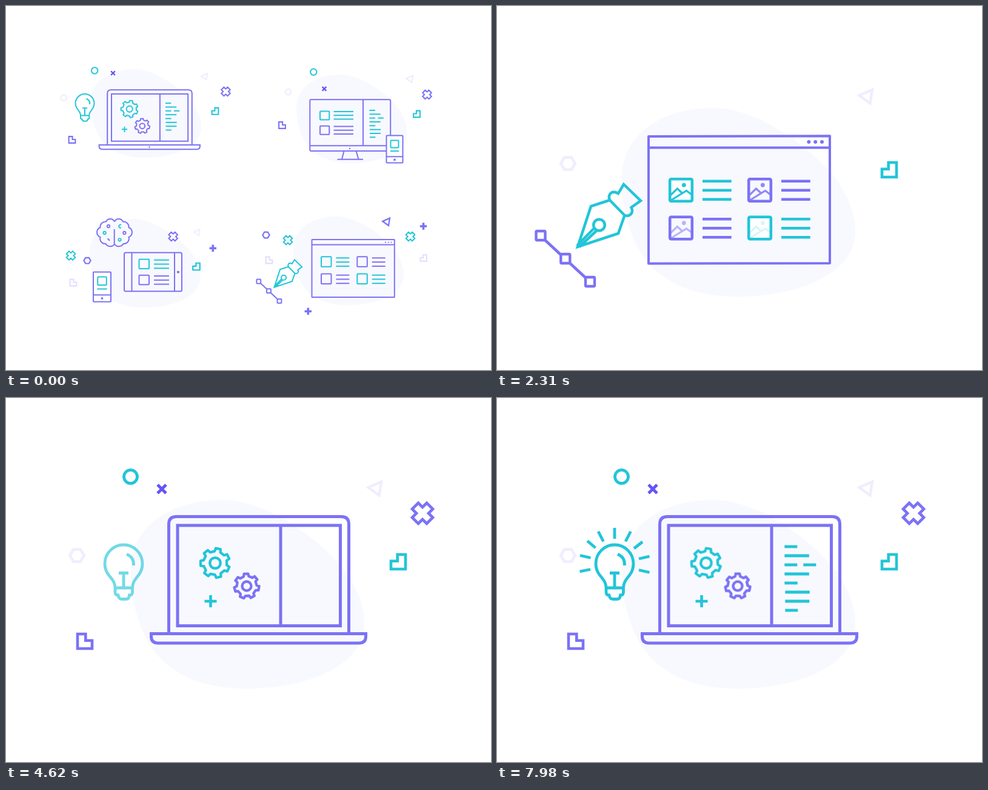
An HTML page for the animation above (8 s loop, 800 px wide and 600 px high).

```html
<!DOCTYPE html>
<html lang="en">
<head>
<meta charset="utf-8">
<title>Workflow illustrations</title>
<style>
  html, body { margin: 0; width: 100%; height: 100%; overflow: hidden; background: #fff; }
  svg { display: block; width: 100%; height: 100%; fill: none; }
</style>
</head>
<body>
<svg id="stage" viewBox="0 0 800 600"></svg>
<script>
const LOOP = 8000;
const P = '#7c72f5', T = '#22c5d8', D = '#6455f6', F = '#f0edfe', G = '#e3ddfd';

// ---- drawing helpers ----
const path = (d, c, w, extra = '') => `<path d="${d}" stroke="${c}" stroke-width="${w}" ${extra}/>`;
const line = (x1, y1, x2, y2, c, w = 2) => path(`M${x1} ${y1}L${x2} ${y2}`, c, w);
const rect = (x, y, w, h, c, s = 2, r = 1, fill = 'none') =>
  `<rect x="${x}" y="${y}" width="${w}" height="${h}" rx="${r}" fill="${fill}" stroke="${c}" stroke-width="${s}"/>`;
const ring = (x, y, r, c, w) => `<circle cx="${x}" cy="${y}" r="${r}" stroke="${c}" stroke-width="${w}"/>`;
const dot = (x, y, r, c) => `<circle cx="${x}" cy="${y}" r="${r}" fill="${c}"/>`;
const group = (id, body) => `<g id="${id}">${body}</g>`;
const place = (x, y, k, body, ky = k) => `<g transform="translate(${x} ${y}) scale(${k} ${ky})">${body}</g>`;
const rows = (x1, x2, y, step, c, w = 2) =>
  [0, 1, 2].map(i => line(x1, y + i * step, x2, y + i * step, c, w)).join('');

// ---- small ornaments, centred on x, y ----
const cross = (x, y, c, k = 1) => place(x, y, k, path(
  'M-7-17L0-10 7-17 17-7 10 0 17 7 7 17 0 10-7 17-17 7-10 0-17-7Z', c, 4.6));
const corner = (x, y, c, k = 1, flip = 1) => place(x, y, k * flip, path(
  'M-12-12H1.3V-1.2H12V12H-12Z', c, 4.6), k);
const wedge = (x, y, c, k = 1) => place(x, y, k, path('M-10.5-2L11-11.5 7.5 11Z', c, 4.3));
const hex = (x, y, c, k = 1) => place(x, y, k, path('M-11.3 0L-5.6-9.6H5.6L11.3 0 5.6 9.6H-5.6Z', c, 4.4));
const times = (x, y, k = 1) => place(x, y, k, path('M-7-7L7 7M7-7L-7 7', D, 4.8));
const plus = (x, y, r, c, w) => path(`M${x - r} ${y}h${2 * r}M${x} ${y - r}v${2 * r}`, c, w);

// ---- objects ----
const blob = `<path fill="#f8f9fe" d="M357 168C430 168 514 232 553 277C579 310 591 343 591 372
  C591 440 500 479 397 479C290 479 240 430 220 370C208 335 204 305 207 272C213 205 280 168 357 168Z"/>`;

const laptop = w =>
  path('M268.5 388V208Q268.5 195.5 281 195.5H553Q565.5 195.5 565.5 208V388', P, w) +
  rect(283, 210, 268.5, 165.5, P, w, 0) + line(453, 210, 453, 375, P, w) +
  path('M239.5 388.5H593.5V393Q593.5 404 582 404H251Q239.5 404 239.5 393Z', P, w);

const bulb = w => path(`M180 313C180 296 163 294 163 273A31 31 0 0 1 225 273C225 294 208.5 296 208.5 313Z
  M180 313V320Q180 325 185 325Q186 331.5 191 331.5H198Q203 331.5 203.5 325Q208.5 325 208.5 320V313
  M186 288.5H202M194 288V313M199 257.5Q211 262 210.5 276`, T, w);

const rays = path(`M194 214V232M167 220L175.5 236.5M220.5 220L212 236.5M149 235.5L162.5 247
  M240 237L226 248M137 259.5L154.5 263.5M251.5 261L234 265M136.5 286L154 282.5M251.5 287.5L234 283.5`, T, 4.8);

const pen = path(`M184 320L153 330 131 397 198 375 208.5 345Z
  M184 320C180 310 188 303 198 309L207 294 235 321 219.5 332C224 341 217 348 208.5 345
  M158.5 366L130 395M162.5 370L134 397`, T, 4.5) + ring(166.5, 361, 9.3, T, 4.5);

function gear(r, hole, phase, c, w) {
  const pts = [];
  for (let i = 0; i < 7; i++)
    for (const [a, k] of [[-14.5, .8], [-9.5, 1], [9.5, 1], [14.5, .8]]) {
      const q = (phase + i * 360 / 7 + a) * Math.PI / 180;
      pts.push((r * k * Math.sin(q)).toFixed(2) + ' ' + (-r * k * Math.cos(q)).toFixed(2));
    }
  return path('M' + pts.join('L') + 'Z', c, w, 'stroke-linejoin="round"') + ring(0, 0, hole, c, w);
}

// text rows of the side panel: [row, start, end]
const CODE = [[0, 0, 21], [1, 0, 40.5], [2, 0, 21], [2, 31, 52], [3, 0, 40.5], [4, 0, 21.5],
              [5, 1, 41.5], [6, 1, 41], [7, 1, 22]];
const code = (x, y, k, step, w) =>
  CODE.map(([r, a, b]) => line(x + a * k, y + r * step, x + b * k, y + r * step, T, w));

const phone = (x, y, w, h, foot, s) =>
  rect(x, y, w, h, P, 2, 1, '#fff') + line(x, foot, x + w, foot, P) +
  dot(x + w / 2, (foot + y + h) / 2, 1.9, P) +
  rect(x + w / 2 - s / 2, y + 8, s, s - 1, T) +
  line(x + 6.3, y + h * .57, x + w - 6.3, y + h * .57, T);

const card = (x, y, s, h, x1, x2, y1, step, c) => rect(x, y, s, h, c) + rows(x1, x2, y1, step, c);
const smallBlob = (x, y) => place(x, y, .474, blob, .47);

// ---- overview of four scenes ----
const sceneLaptop = smallBlob(41.9, 25) +
  hex(95.2, 151.5, F, .46) + ring(146.2, 106.5, 5.2, T, 2) + times(176.5, 110.7, .48) +
  wedge(327, 116.5, F, .46) + cross(362.5, 141, P, .43) + corner(345, 173.3, T, .45, -1) +
  corner(109, 220.5, P, .45) + place(33, 24, .5, bulb(4)) +
  place(41, 46.3, .47, laptop(4.3)) + dot(236.5, 232.5, 1.2, P) +
  place(203.7, 169.8, 1, gear(14.2, 5, 12, T, 2)) + place(224.8, 197.8, 1, gear(12.4, 4.4, -3, P, 2)) +
  plus(195.5, 203.3, 4.6, T, 2) + code(263, 160.2, .45, 6.33, 2).join('');

const sceneDesktop = smallBlob(381.5, 34) +
  hex(465.5, 141.5, F, .46) + ring(507.3, 108.8, 5.2, T, 2) + times(525, 136.5, .48) +
  wedge(665.5, 120.5, F, .52) + cross(694.5, 146, P, .43) + corner(677.5, 178, T, .45, -1) +
  corner(455.5, 196.5, P, .45) +
  rect(501.3, 154.3, 132.9, 84.7, P, 2, 2) + line(501, 230.3, 634, 230.3, P) +
  line(589, 154, 589, 230, P) + dot(567, 235, 1.2, P) +
  path('M557.5 239L554 252.5M577.5 239L581.5 252.5M546.5 252.7H589', P, 2) +
  card(518, 173.5, 15.3, 14, 540.5, 573, 174, 6.2, T) +
  card(518, 197.8, 15.3, 14, 540.5, 573, 198.5, 6.2, P) +
  code(599.5, 172, .45, 6.33, 2).join('') + phone(627.5, 213.5, 27, 45, 248.3, 13);

const half = f => `M179 355.5A7.6 7.4 0 0 ${f} `;
const mirror = (pts, f) => half(f) + pts.map(([x, y], i) =>
  (i ? `A8.6 8.6 0 0 ${f} ` : '') + `${f ? 358 - x : x} ${y}`).join('');
const LOBES = [[165, 355.5], [155.5, 365], [155.5, 381], [164.5, 392], [179, 392.5]];
const brain = path(mirror(LOBES, 0) + mirror(LOBES, 1) + 'M178.7 368V393', P, 2) +
  ring(169, 363, 2.2, P, 1.9) + ring(195.3, 374, 2.2, P, 1.9) +
  ring(162.6, 374, 2.2, T, 1.9) + ring(187.5, 385.3, 2.2, T, 1.9) +
  path('M190 361A2.5 2.5 0 1 0 190 365.3', T, 1.9) + path('M167.3 384Q170.5 384 170.5 387.3', P, 1.9);

const sceneTablet = smallBlob(40.5, 272) + brain +
  hex(134, 419.7, P, .5) + cross(107, 411.4, T, .43) + corner(111, 456, G, .45) +
  cross(275.7, 380, P, .43) + wedge(314.5, 373.5, F, .46) + plus(341.3, 399.3, 5.7, P, 3.6) +
  corner(314, 429.5, T, .48, -1) + phone(144, 438.5, 29, 49, 476.3, 14.5) +
  rect(195, 406.5, 95, 63.8, P, 2, 2.5) + path('M207.5 406.5V470M278 406.5V470', P, 2) +
  dot(284, 438.6, 2.1, P) +
  card(219.5, 417.5, 16.5, 15.5, 244, 269, 418.7, 6.8, T) +
  card(219.5, 443.8, 16.5, 15.5, 244, 269, 445, 6.8, P);

const sceneBrowser = smallBlob(376, 268) +
  hex(429, 377.5, P, .5) + cross(465, 386, T, .43) + corner(434, 419, G, .45) +
  wedge(627, 356, P, .54) + plus(688.5, 363, 5.7, P, 3.6) + cross(667, 380, T, .43) +
  corner(688.7, 415.5, G, .43, -1) + plus(498.3, 503.3, 5.7, P, 3.6) +
  place(384.8, 288.9, .44, pen) + line(416.8, 454, 451, 486.3, P) +
  [[416.8, 454], [433.5, 469.7], [451, 486.3]].map(([x, y]) => rect(x - 3.4, y - 3.4, 6.8, 6.8, P, 2, .8, '#fff')).join('') +
  rect(504.5, 385, 136.3, 95, P, 2, .5) + line(504.5, 393.5, 640.7, 393.5, P) +
  [626, 630.8, 635.4].map(x => dot(x, 389.5, 1.1, P)).join('') +
  [[520, 413.3, T], [579.3, 413.3, P], [520, 441.6, P], [579.3, 441.6, T]]
    .map(([x, y, c]) => card(x, y, 16.5, 16.5, x + 24.4, x + 46.4, y + 2, 6.8, c)).join('');

// ---- large scenes ----
const CARDS = [[303.5, 303.5, T], [433.5, 303.5, P], [303.5, 366, P], [433.5, 366, T]];
const NODES = [[72, 378.5], [112.8, 416.5], [153.5, 454.5]];
const photo = (x, y, c) => dot(x + 4.8, y - 8.3, 3.4, c) +
  path(`M${x - 17} ${y + 8}l11-10.5 8 7.5M${x - 17} ${y + 17}l26-16 9.5 7`, c, 3.2);

const largeBrowser =
  group('frame', path('M250 215L549 214.3 549 424 250 424.5Z', P, 4,
    'id="edge" pathLength="1" stroke-dasharray="1 1.1" stroke-linecap="round" stroke-linejoin="round"') +
    path('M250 233.5H549', P, 4, 'id="bar" pathLength="1" stroke-dasharray="1 1.1" stroke-linecap="round"')) +
  [514.3, 525.2, 536].map((x, i) => group('dot' + i, dot(x, 224, 3, P))).join('') +
  CARDS.map(([x, y, c], i) =>
    group('box' + i, rect(x - 18.3, y - 18.3, 36.6, 36.6, c, 4.6, 2, c === T ? '#fff' : 'none')) +
    group('rows' + i, rows(x + 35.5, x + 83.2, y - 14.7, 15, c, 4.6)) +
    group('photo' + i, photo(x, y, c))).join('') +
  group('stem', path('M74.5 381.5L150.5 452', P, 4.6, 'id="cord" pathLength="1" stroke-dasharray="1 1.1"')) +
  NODES.map(([x, y], i) => group('node' + i, rect(x - 7.5, y - 7.5, 15, 15, P, 4.4, 1.5, '#fff'))).join('') +
  group('pen', pen);

const largeLaptop =
  group('laptop', laptop(5) + corner(130, 401, P)) +
  `<g transform="translate(345 272)">${group('gearA', gear(24.3, 8.7, 12, T, 4.3))}</g>` +
  `<g transform="translate(397 310)">${group('gearB', gear(20.6, 7.5, -3, P, 4.3))}</g>` +
  group('plus', plus(337.5, 335, 10, T, 4.6)) +
  group('bulb', bulb(4.8)) + group('rays', rays) +
  code(474.3, 245, 1, 15, 4.8).map((l, i) => group('code' + i, l)).join('');

const ornaments =
  group('hex', hex(117, 259.6, F, 1.04)) + group('wedge', wedge(608, 149.5, F)) +
  group('corner', corner(647, 270, T, 1, -1)) + group('cross', cross(687, 190, P)) +
  group('times', times(257, 150)) + group('ring', ring(205.5, 129.7, 11, T, 4.8));

document.getElementById('stage').innerHTML =
  group('blob', blob) + ornaments + largeBrowser + largeLaptop +
  group('overview', sceneLaptop + sceneDesktop + sceneTablet + sceneBrowser);

// ---- motion ----
// steps: [ms, value, easing]
function track(id, prop, steps) {
  const frames = steps.map(([ms, v, easing = 'linear']) => ({ offset: ms / LOOP, [prop]: v, easing }));
  frames.unshift({ ...frames[0], offset: 0, easing: 'linear' });
  frames.push({ ...frames[frames.length - 1], offset: 1 });
  document.getElementById(id).animate(frames, { duration: LOOP, iterations: Infinity });
}
const show = (id, a, b = a, c, d, ease) => track(id, 'opacity',
  [[a, 0, ease], [b, 1], ...(c ? [[c, 1], [d, 0]] : [])]);
const draw = (id, a, b) => track(id, 'strokeDashoffset', [[a, 1.02], [b, 0]]);

track('overview', 'opacity', [[0, 1], [270, 0]]);
show('blob', 30, 270);

// browser scene
show('frame', 990, 990, 3030, 3450);
draw('edge', 990, 1700);
draw('bar', 1715, 2010);
track('bar', 'opacity', [[1715, 0], [1715, 1]]);
show('stem', 990, 990, 3300, 3600);
draw('cord', 990, 1500);
CARDS.forEach((_, i) => {
  const at = 1200 + i * 90, out = 3200 + i * 15;
  show('box' + i, at, at + 180, out, out + 480);
  show('rows' + i, at + 90, at + 270, out, out + 480);
  show('photo' + i, 2100 + i * 60, 2280 + i * 60, out - 30, out + 450);
});
NODES.forEach((_, i) => {
  show('node' + i, 1920 + i * 60, 2010 + i * 60, 3300, 3600);
  show('dot' + i, 1980 + i * 60, 2040 + i * 60, 3210, 3570);
});
show('pen', 1650, 1900, 3120, 3600);
track('pen', 'transform', [[1650, 'translateX(-10px)'], [1900, 'translateX(2px)']]);

// ornaments stay once shown
show('hex', 1950);
show('wedge', 2100);
show('corner', 2250);
show('cross', 2400);
show('times', 2520);
show('ring', 2850);

// laptop scene
show('laptop', 3990, 4020);
show('gearA', 4170, 4380);
show('gearB', 4260, 4470);
show('plus', 4350, 4560);
show('bulb', 4440, 5100, 0, 0, 'cubic-bezier(.22,.61,.36,1)');
show('rays', 4830, 5250);
[5490, 5640, 5790, 5940, 6090, 6240, 6390, 6540, 6660].forEach((ms, i) => show('code' + i, ms));

const spin = dir => Array.from({ length: 9 }, (_, i) =>
  [6930 + i / 8 * 1070, `rotate(${dir * 103 * (i / 8) ** 1.5}deg)`]);
track('gearA', 'transform', spin(1));
track('gearB', 'transform', spin(-1));
</script>
</body>
</html>
```
